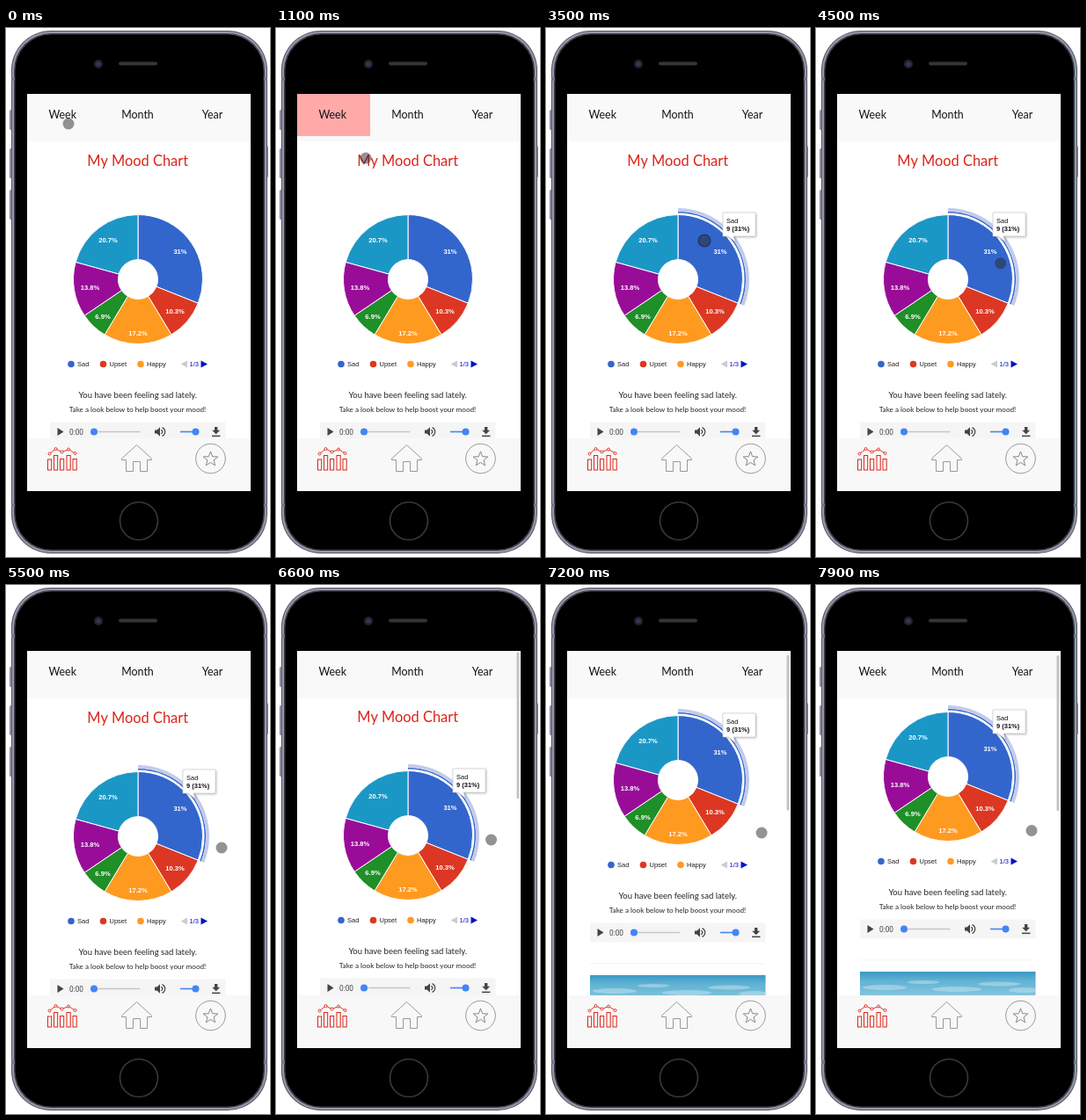
An HTML page with a canvas that plays this animation: 300x602 px, repeating every 8 s.

```html
<!DOCTYPE html>
<html lang="en">
<head>
<meta charset="utf-8">
<title>Mood chart</title>
<style>
  html, body { margin: 0; width: 100%; height: 100%; overflow: hidden; background: #fff; }
  canvas { display: block; width: 300px; height: 602px; }
</style>
</head>
<body>
<canvas id="stage"></canvas>
<script>
const W = 300, H = 602, LOOP = 8000, STEP = 100;
const canvas = document.getElementById('stage');
const dpr = window.devicePixelRatio || 1;
canvas.width = W * dpr;
canvas.height = H * dpr;
const c = canvas.getContext('2d');

const LATO = 'Lato, sans-serif';
const ARIAL = '"Liberation Sans", Arial, sans-serif';
const RED = '#dc2418', BLUE = '#3366cc', INK = '#444';
const CX = 150, CY = 286, R = 73.5, HOLE = 22.5;

// share of 29 entries, colour, label, label position
const slices = [
  [9, BLUE, '31%', 198, 254],
  [3, '#dc3723', '10.3%', 192, 322],
  [5, '#ff9a20', '17.2%', 150, 347.5],
  [2, '#1f8f27', '6.9%', 110, 328],
  [4, '#990c98', '13.8%', 95.5, 295],
  [6, '#1b97c6', '20.7%', 116, 241]
];

// keyframes: time, x, y
const pointerKeys = [
  [0, 71, 109], [900, 76, 110], [1000, 87, 126], [1100, 102, 148],
  [1300, 132, 188], [1500, 159, 220], [1800, 176, 238], [2700, 180, 242],
  [4000, 180, 242], [4300, 193, 253], [4600, 218, 275], [4900, 238, 292],
  [5200, 245, 299], [5900, 245, 299], [6300, 245, 295], [6600, 244.5, 290],
  [7200, 245, 282], [7900, 245, 279.5]
];
const scrollKeys = [
  [6500, 0], [6600, 1], [6700, 5], [6800, 15], [6900, 30], [7000, 45],
  [7100, 57], [7200, 64], [7400, 66], [7600, 67.2], [7900, 68]
];
const TAB_ON = 400, CLICK = 3200, SCROLL_ON = 6500;

function track(keys, t, i) {
  if (t <= keys[0][0]) return keys[0][i];
  for (let k = 1; k < keys.length; k++) {
    const a = keys[k - 1], b = keys[k];
    if (t <= b[0]) return a[i] + (b[i] - a[i]) * (t - a[0]) / (b[0] - a[0]);
  }
  return keys[keys.length - 1][i];
}

function rect(x, y, w, h, fill, r = 0) {
  c.beginPath();
  c.roundRect(x, y, w, h, r);
  c.fillStyle = fill;
  c.fill();
}

function disc(x, y, r, fill) {
  c.beginPath();
  c.arc(x, y, r, 0, Math.PI * 2);
  c.fillStyle = fill;
  c.fill();
}

function poly(points, fill, stroke, close = true, width = 1) {
  c.beginPath();
  points.forEach(([x, y]) => c.lineTo(x, y));
  if (close) c.closePath();
  if (fill) { c.fillStyle = fill; c.fill(); }
  if (stroke) { c.strokeStyle = stroke; c.lineWidth = width; c.stroke(); }
}

function arc(x, y, r, from, to, stroke, width = 1) {
  c.beginPath();
  c.arc(x, y, r, from, to);
  c.strokeStyle = stroke;
  c.lineWidth = width;
  c.stroke();
}

function text(s, x, y, font, fill, align = 'left') {
  c.font = font;
  c.textAlign = align;
  c.fillStyle = fill;
  c.fillText(s, x, y);
}

function drawPhone() {
  [[93, 23], [137, 34], [184, 34]].forEach(([y, h]) => rect(4, y, 4, h, '#8d8f9e', 1.5));
  rect(294, 134, 4, 36, '#8d8f9e', 1.5);
  rect(6, 3, 291, 595, '#565866', 45);
  rect(7, 4, 289, 593, '#9799aa', 44);
  rect(9, 6, 285, 589, '#41434e', 42);
  rect(10.5, 7.5, 282, 586, '#000', 41);
  rect(6, 56, 4, 4, '#74768a');
  rect(293, 56, 4, 4, '#74768a');
  rect(6, 541, 4, 4, '#74768a');
  rect(293, 541, 4, 4, '#74768a');

  disc(105, 41, 5, '#22232b');
  disc(105, 41, 2.6, '#34375a');
  rect(128, 38.5, 44, 4, '#34343a', 2);
  arc(151, 561, 21.5, 0, Math.PI * 2, '#3a3a3e', 1.6);
}

function drawPie(selected) {
  const top = -Math.PI / 2;
  let a = top;
  for (const [n, fill] of slices) {
    const b = a + n / 29 * Math.PI * 2;
    c.beginPath();
    c.arc(CX, CY, R, a, b);
    c.arc(CX, CY, HOLE, b, a, true);
    c.closePath();
    c.fillStyle = fill;
    c.fill();
    c.strokeStyle = '#fff';
    c.lineWidth = 1;
    c.stroke();
    a = b;
  }
  for (const s of slices) text(s[2], s[3], s[4] + 2.7, 'bold 7.6px ' + ARIAL, '#fff', 'center');
  if (selected) {
    const end = top + 9 / 29 * Math.PI * 2;
    arc(CX, CY, 76.3, top, end, BLUE, 1.5);
    arc(CX, CY, 79.1, top, end, '#c2cbec', 3.8);
  }
}

function drawTooltip() {
  c.save();
  c.shadowColor = 'rgba(0,0,0,.3)';
  c.shadowBlur = 3 * dpr;
  c.shadowOffsetX = c.shadowOffsetY = dpr;
  const shape = [[201, 210], [238, 210], [238, 237], [213, 237], [215, 243], [207, 237], [201, 237]];
  poly(shape, '#fff');
  c.restore();
  poly(shape, '#fff', '#ccc', true, 0.7);
  text('Sad', 205, 221.5, '7.5px ' + ARIAL, '#111');
  text('9 (31%)', 205, 231, 'bold 7.5px ' + ARIAL, '#111');
}

function drawLegend() {
  [['Sad', 74, BLUE], ['Upset', 110.5, '#dc3723'], ['Happy', 153, '#ff9a20']].forEach(([s, x, fill]) => {
    disc(x, 382.5, 3.8, fill);
    text(s, x + 7, 385, '7.5px ' + ARIAL, '#222');
  });
  poly([[206, 378.5], [206, 386.5], [198.5, 382.5]], '#ccc');
  text('1/3', 213.7, 385, '7.5px ' + ARIAL, '#0011cc', 'center');
  poly([[221.5, 378.5], [221.5, 386.5], [229, 382.5]], '#0011cc');
}

function drawPlayer() {
  const y = 459.5;
  rect(50, 448.5, 199.5, 22, '#f5f5f5');
  poly([[58.5, y - 4.5], [65.5, y], [58.5, y + 4.5]], INK);
  text('0:00', 72, 462.5, '8.3px Roboto, sans-serif', INK);
  rect(100, y - 0.8, 52.5, 1.6, '#c6c6c6');
  disc(100, y, 4, '#4285f4');
  poly([[169, y - 2], [171.5, y - 2], [175, y - 5.3], [175, y + 5.3], [171.5, y + 2], [169, y + 2]], INK);
  arc(175.6, y, 2.2, -1.3, 1.3, INK, 1.3);
  arc(175.6, y, 5.2, -1.2, 1.2, INK, 1.3);
  rect(198, y - 0.8, 17, 1.6, '#4285f4');
  disc(215.5, y, 4, '#4285f4');
  rect(237, 454, 3.4, 4.2, INK);
  poly([[234.2, 457.7], [243.2, 457.7], [238.7, 462.3]], INK);
  rect(234, 463.6, 9.4, 1.5, INK);
}

function drawPhoto() {
  const sky = c.createLinearGradient(0, 508, 0, 540);
  sky.addColorStop(0, '#3a98c4');
  sky.addColorStop(0.3, '#5fb1d3');
  sky.addColorStop(1, '#8ecbe0');
  rect(50, 508, 199.5, 120, sky);
  c.save();
  c.beginPath();
  c.rect(50, 508, 199.5, 120);
  c.clip();
  [[78, 526, 25, 3], [122, 520, 18, 2], [160, 528, 28, 3], [208, 522, 24, 2.5], [236, 529, 17, 3]].forEach(([x, y, rx, ry]) => {
    c.beginPath();
    c.ellipse(x, y, rx, ry, 0, 0, Math.PI * 2);
    c.fillStyle = 'rgba(200,228,238,.5)';
    c.fill();
  });
  c.restore();
}

function drawPage(t) {
  const selected = t >= CLICK;
  text('My Mood Chart', 149.7, 157, '16.4px ' + LATO, RED, 'center');
  drawPie(selected);
  if (selected) drawTooltip();
  drawLegend();
  text('You have been feeling sad lately.', 149.7, 420.5, '9.5px ' + LATO, '#222', 'center');
  text('Take a look below to help boost your mood!', 149.5, 436.5, '8.15px ' + LATO, '#222', 'center');
  drawPlayer();
  rect(50, 494.5, 199.5, 0.8, '#eee');
  drawPhoto();
}

function drawHeader(t) {
  rect(24, 75, 254, 54, '#f9f9f9');
  if (t >= TAB_ON && t < CLICK) rect(24, 75, 83, 48, '#ffa9a9');
  [['Week', 64.2], ['Month', 149.5], ['Year', 234.5]].forEach(([s, x]) =>
    text(s, x, 103, '12.4px ' + LATO, '#111', 'center'));
}

function drawFooter() {
  rect(24, 467, 254, 60, '#f8f8f8');

  [[47.5, 491], [54.5, 486.5], [61.5, 490.5], [69, 486.5], [76, 490.5]].forEach(([x, y]) => {
    c.strokeStyle = RED;
    c.lineWidth = 1;
    c.strokeRect(x, y, 4.2, 503 - y);
  });
  const dots = [[49.5, 484.5], [56.5, 479], [63.5, 482.5], [71, 479.5], [78.5, 484]];
  poly(dots, null, RED, false, 0.9);
  dots.forEach(([x, y]) => {
    disc(x, y, 1.5, '#f8f8f8');
    arc(x, y, 1.5, 0, Math.PI * 2, RED, 0.9);
  });

  poly([[148.5, 474.5], [165.5, 490], [165.5, 491.5], [160.5, 491.5], [160.5, 504.5],
    [152.5, 504.5], [152.5, 493.5], [144.5, 493.5], [144.5, 504.5], [136.5, 504.5],
    [136.5, 491.5], [131.5, 491.5], [131.5, 490]], null, '#999');

  arc(232.5, 490, 16.8, 0, Math.PI * 2, '#999');
  const star = Array.from({ length: 10 }, (_, i) => {
    const r = i % 2 ? 3.7 : 8.8, a = i * Math.PI / 5;
    return [232.5 + r * Math.sin(a), 490.7 - r * Math.cos(a)];
  });
  poly(star, null, '#888');
}

function drawPointer(t) {
  const x = track(pointerKeys, t, 1), y = track(pointerKeys, t, 2);
  const down = (t >= 300 && t < 600) || (t >= 3100 && t < 3700);
  disc(x, y, down ? 7 : 6.5, 'rgba(40,40,40,.5)');
  if (down) arc(x, y, 7, 0, Math.PI * 2, 'rgba(20,30,50,.6)', 1.2);
}

function draw(t) {
  const scroll = track(scrollKeys, t, 1);
  c.setTransform(dpr, 0, 0, dpr, 0, 0);
  c.fillStyle = '#fff';
  c.fillRect(0, 0, W, H);
  drawPhone();
  c.save();
  c.beginPath();
  c.rect(24, 75, 254, 452);
  c.clip();
  rect(24, 75, 254, 452, '#fff');
  c.save();
  c.translate(0, -scroll);
  drawPage(t);
  c.restore();
  drawHeader(t);
  drawFooter();
  if (t >= SCROLL_ON) {
    const y = 76.5 + scroll * 0.05;
    rect(273.5, y, 3, 243 + scroll * 0.21 - y, '#c4c4c4', 1.5);
  }
  drawPointer(t);
  c.restore();
}

const start = performance.now();
function tick() {
  const t = (performance.now() - start) % LOOP;
  draw(Math.floor(t / STEP) * STEP);
  requestAnimationFrame(tick);
}
tick();
</script>
</body>
</html>
```
